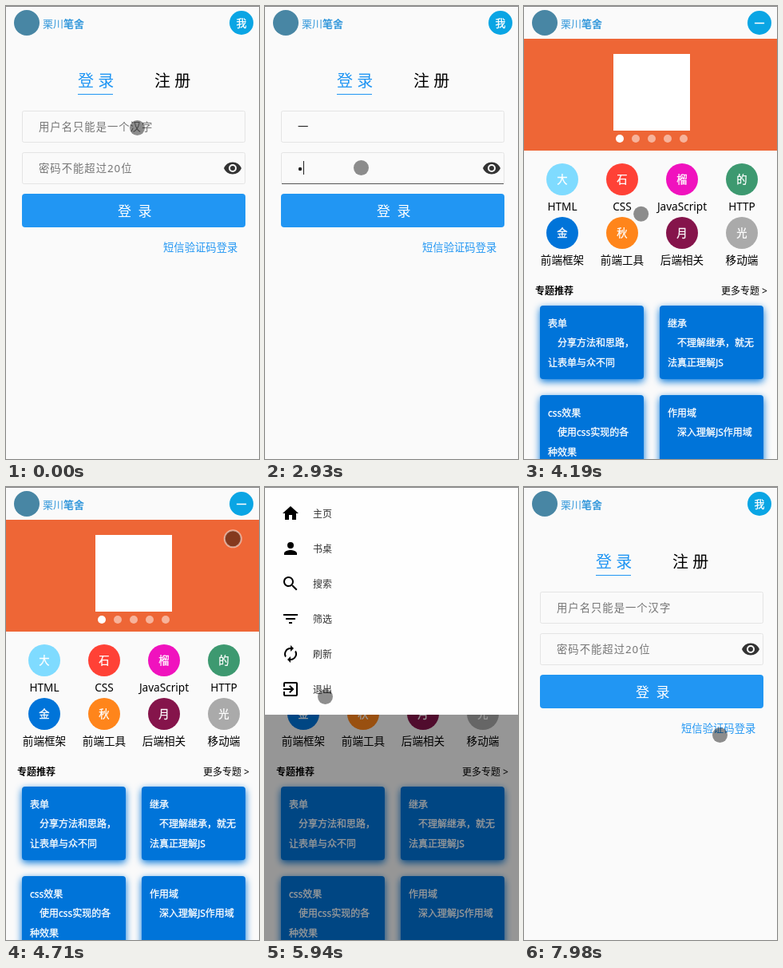
These frames come from a looping animation (317 by 567 pixels, 8000 ms). An HTML page:

```html
<!DOCTYPE html>
<html lang="zh-CN">
<head>
<meta charset="utf-8">
<title>登录</title>
<style>
  html, body { margin: 0; width: 100%; height: 100%; overflow: hidden; background: #fafafa; }
  svg { display: block; width: 317px; height: 567px; }
  text { font: 13.333px 'Noto Sans', 'Noto Sans CJK SC', sans-serif; white-space: pre; }
  .mid { text-anchor: middle; }
  .blue { fill: #2196f3; }
  .brand { font-size: 13px; fill: #3498db; }
  .bold { font-weight: bold; }
  .tab { font-size: 20px; }
  .tab.on { fill: #2196f3; }
  .field { fill: none; stroke: #e4e4e4; }
  .hint { fill: #757575; letter-spacing: 1px; }
  .submit { font-size: 17px; letter-spacing: 2px; fill: #fff; }
  .label { font-size: 13.6px; text-anchor: middle; }
  .small { font-size: 12px; }
  .card { fill: #0074d9; filter: drop-shadow(0 3px 5px #0074d9); }
  .white { fill: #fff; stroke: #fff; stroke-width: .3px; }
  .dim { fill: #000; opacity: .4; }
</style>
</head>
<body>
<svg viewBox="0 0 317 567">
  <rect width="317" height="567" fill="#fafafa"/>
  <circle cx="26" cy="21" r="16" fill="#4886a4"/>
  <text class="brand" x="46" y="26.5">栗川<tspan class="bold">笔舍</tspan></text>
  <circle cx="295" cy="21" r="15" fill="#0aa5e4"/>
  <text id="user" class="mid white" style="font-size:13px" x="295" y="26"></text>

  <g id="login">
    <text id="tabIn" class="tab" x="90" y="100.5">登 录</text>
    <text id="tabUp" class="tab" x="186" y="100.5">注 册</text>
    <rect id="underline" y="110" width="44" height="1" class="blue"/>
    <rect class="field" x="20.5" y="131.5" width="279" height="39" rx="2"/>
    <rect class="field" x="20.5" y="183.5" width="279" height="39" rx="2"/>
    <path id="focusLine" d="M21 0H299" stroke="#555"/>
    <text id="nameHint" class="hint" x="41" y="156">用户名只能是一个汉字</text>
    <text id="passHint" class="hint" x="41" y="208">密码不能超过20位</text>
    <text id="name" x="41" y="156" fill="#222">一</text>
    <circle id="pass" cx="44" cy="204" r="2.2" fill="#222"/>
    <path id="caret" d="M.5 -8.5V8.5" stroke="#222"/>
    <path transform="translate(272 191)" fill="#333" d="M12 4.5C7 4.5 2.73 7.61 1 12c1.73 4.39 6 7.5 11 7.5s9.27-3.11 11-7.5c-1.73-4.39-6-7.5-11-7.5zM12 17a5 5 0 1 1 0-10 5 5 0 0 1 0 10zm0-8a3 3 0 1 0 0 6 3 3 0 0 0 0-6z"/>
    <rect class="blue" x="20" y="235" width="280" height="42" rx="4"/>
    <text id="submit" class="submit" x="140" y="262.5"></text>
    <text id="sms" class="blue" x="197" y="307">短信验证码登录</text>
  </g>

  <g id="loading">
    <rect class="dim" width="317" height="567"/>
    <rect x="70" y="101" width="180" height="118" rx="4" fill="#676767" style="filter:drop-shadow(0 2px 3px #0007)"/>
    <path id="spinner" fill="none" stroke="#2196f3" stroke-width="4" stroke-linecap="round"/>
    <text class="mid bold" x="160" y="192" fill="#eee" style="font-size:14px">请稍候</text>
  </g>

  <g id="home">
    <rect y="41" width="317" height="140" fill="#ee6636"/>
    <rect x="112" y="60" width="96" height="96" fill="#fff"/>
    <g id="dots"></g>
    <g id="topics"></g>
    <text class="small bold" x="14" y="360.5">专题推荐</text>
    <text class="small" x="305" y="360.5" text-anchor="end">更多专题 &gt;</text>
    <g id="cards"></g>
  </g>

  <rect id="shade" class="dim" width="317" height="567"/>
  <g id="menu"><rect width="317" height="285" fill="#fefefe"/></g>

  <rect width="317" height="1" fill="#858585"/>
  <circle id="pointer" transform="translate(-.5 .5)"/>
</svg>
<script>
const $ = id => document.getElementById(id);
const show = (id, on) => { $(id).style.display = on ? '' : 'none'; };
const set = (id, attrs) => { for (const k in attrs) $(id).setAttribute(k, attrs[k]); };
const label = (x, y, cls, str) => `<text class="${cls}" x="${x}" y="${y}">${str}</text>`;
const within = (t, a, b) => t >= a && t < b;

$('dots').innerHTML = [0, 1, 2, 3, 4].map(i =>
  `<circle cx="${120 + 20 * i}" cy="166" r="5" fill="#fff" opacity="${i ? .5 : 1}"/>`).join('');

$('topics').innerHTML = [
  ['大', 'HTML', '#7fdbff'], ['石', 'CSS', '#ff4136'], ['榴', 'JavaScript', '#f012be'], ['的', 'HTTP', '#3d9970'],
  ['金', '前端框架', '#0074d9'], ['秋', '前端工具', '#ff851b'], ['月', '后端相关', '#85144b'], ['光', '移动端', '#aaa']
].map(([glyph, title, color], i) => {
  const x = 48 + 75 * (i % 4), y = 217 + 67 * (i >> 2);
  return `<circle cx="${x}" cy="${y}" r="20" fill="${color}"/>` +
    label(x, y + 5, 'mid white', glyph) + label(x, y + 39, 'label', title);
}).join('');

$('cards').innerHTML = [
  ['表单', '分享方法和思路，', '让表单与众不同'],
  ['继承', '不理解继承，就无', '法真正理解JS'],
  ['css效果', '使用css实现的各', '种效果'],
  ['作用域', '深入理解JS作用域', '']
].map((lines, i) => {
  const x = 20 + 150 * (i % 2), y = 375 + 112 * (i >> 1);
  return `<rect class="card" x="${x}" y="${y}" width="130" height="92" rx="4"/>` +
    lines.map((s, n) => label(x + (n === 1 ? 22 : 10), y + 26.5 + 24.5 * n, 'small white', s)).join('');
}).join('');

$('menu').innerHTML += [
  ['主页', 'M10 20v-6h4v6h5v-8h3L12 3 2 12h3v8z'],
  ['书桌', 'M12 12a4 4 0 1 0 0-8 4 4 0 0 0 0 8zm0 2c-2.67 0-8 1.34-8 4v2h16v-2c0-2.66-5.33-4-8-4z'],
  ['搜索', 'M15.5 14h-.8l-.3-.3a6.5 6.5 0 1 0-.7.7l.3.3v.8l5 5 1.5-1.5zm-6 0a4.5 4.5 0 1 1 0-9 4.5 4.5 0 0 1 0 9z'],
  ['筛选', 'M10 18h4v-2h-4zM3 6v2h18V6zm3 7h12v-2H6z'],
  ['刷新', 'M12 6v3l4-4-4-4v3a8 8 0 0 0-6.76 12.26l1.46-1.46A6 6 0 0 1 12 6zm6.76 1.74L17.3 9.2A6 6 0 0 1 12 18v-3l-4 4 4 4v-3a8 8 0 0 0 6.76-12.26z'],
  ['退出', 'M10.1 15.6L11.5 17l5-5-5-5-1.4 1.4 2.6 2.6H3v2h9.7zM19 3H5a2 2 0 0 0-2 2v4h2V5h14v14H5v-4H3v4a2 2 0 0 0 2 2h14a2 2 0 0 0 2-2V5a2 2 0 0 0-2-2z']
].map(([title, d], i) =>
  `<path transform="translate(20 ${21 + 44 * i})" d="${d}"/>` +
  `<text class="small" x="60" y="${37.5 + 44 * i}" fill="#333">${title}</text>`).join('');

// Pointer stops: time, x, y
const PATH = [
  [0, 165, 152], [1120, 165, 152], [1550, 306, 208], [1700, 335, 208], [2080, 335, 208],
  [2360, 121, 202], [2930, 121, 202], [3202, 147, 260], [4157, 147, 260], [4704, 285, 64],
  [4976, 295, 25], [5385, 295, 25], [5930, 76, 262], [6203, 76, 262], [6612, 285, 33],
  [6885, 208, 95], [7158, 208, 95], [7294, 112, 95], [7567, 112, 95], [7976, 246, 310], [8000, 246, 310]
];
const PRESSES = [[150, 560], [2510, 2650], [3330, 3900], [4700, 4830], [4970, 5110], [6060, 6200], [7020, 7150], [7425, 7560]];

// The screen refreshes in coarse steps
const EARLY = [0, 150, 560, 1120, 1550, 1700, 2080, 2220, 2360, 2510, 2650];
const STEP = 136.4;
const hold = t => t < 2930
  ? EARLY.filter(e => e <= t).pop()
  : 2930 + Math.floor((t - 2930) / STEP) * STEP;

function pointerAt(t) {
  const i = Math.max(1, PATH.findIndex(p => p[0] > t));
  const [t0, x0, y0] = PATH[i - 1], [t1, x1, y1] = PATH[i];
  const k = (t - t0) / (t1 - t0);
  return [x0 + (x1 - x0) * k, y0 + (y1 - y0) * k];
}

function drawPointer(t) {
  const [cx, cy] = pointerAt(t);
  const down = PRESSES.some(([a, b]) => within(t, a, b));
  set('pointer', {
    cx, cy, r: down ? 10.5 : 9.5, 'stroke-width': down ? 2 : 0,
    stroke: 'rgba(255,255,255,.5)', fill: 'rgba(0,0,0,.44)'
  });
}

function drawLogin(t) {
  const register = within(t, 7150, 7560), session = t < 4000;
  const named = session && t >= 2080, secret = session && t >= 2900;
  const onName = within(t, 560, 2650), onPass = within(t, 2650, 3400);
  $('tabIn').classList.toggle('on', !register);
  $('tabUp').classList.toggle('on', register);
  set('underline', { x: register ? 186 : 90 });
  $('submit').textContent = register ? '注 册' : '登 录';
  show('sms', !register);
  show('name', named);
  show('nameHint', !named);
  show('pass', secret);
  show('passHint', !secret);
  show('focusLine', onName || onPass);
  set('focusLine', { transform: `translate(0 ${onPass ? 222.5 : 170.5})` });
  show('caret', (onName && !within(t, 1120, 1550)) || onPass);
  const x = onPass ? (secret ? 48 : 41) : (named ? 55 : 41);
  set('caret', { transform: `translate(${x} ${onPass ? 202.5 : 151.5})` });
}

function drawSpinner(t) {
  const p = Math.max(0, (t - 3612) / 750);
  const a = .08 + 4 * p * p * (3 - 2 * p);
  const x = 160 + 19 * Math.cos(a), y = 146 + 19 * Math.sin(a);
  set('spinner', { d: `M179 145A19 19 0 ${a > Math.PI ? 1 : 0} 1 ${x} ${y}` });
}

function drawMenu(t) {
  const open = within(t, 5100, 6050);
  const k = Math.min(1, (t - 5000) / 380);
  show('shade', open);
  show('menu', open);
  set('menu', { transform: `translate(0 ${-285 * (1 - k) ** 2})` });
}

function render(now) {
  const t = hold(now % 8000);
  const atHome = within(t, 4000, 6190), loading = within(t, 3450, 4000);
  show('home', atHome);
  show('login', !atHome);
  show('loading', loading);
  $('user').textContent = atHome ? '一' : '我';
  if (!atHome) drawLogin(t);
  if (loading) drawSpinner(t);
  drawMenu(t);
  drawPointer(t);
}

let start;
function tick(now) {
  start ??= now;
  render(now - start);
  requestAnimationFrame(tick);
}
render(0);
requestAnimationFrame(tick);
</script>
</body>
</html>
```
